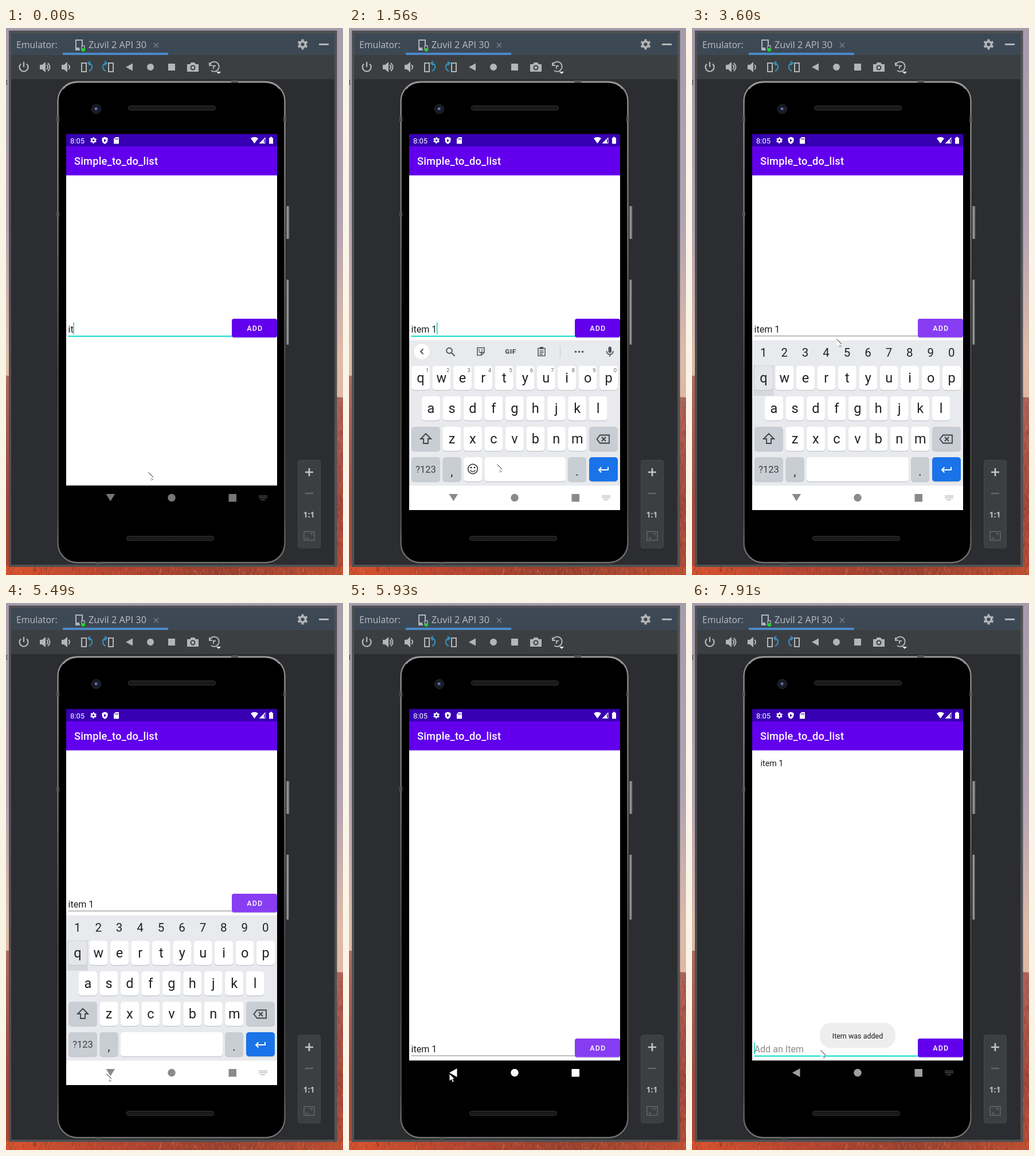
These frames come from a looping animation (588x952 px, 8 s). An HTML page:

```html
<!DOCTYPE html>
<html lang="en">
<head>
<meta charset="utf-8">
<title>To-do list in an emulator</title>
<style>
html, body { margin: 0; width: 100%; height: 100%; overflow: hidden; background: #2b2d30; }
svg { display: block; }
text { font-family: Roboto, "Liberation Sans", sans-serif; white-space: pre; }
.ui { font-family: "Open Sans", "Noto Sans", sans-serif; fill: #bcbec2; }
.line { fill: none; stroke: currentColor; stroke-width: 2; }
.icon { color: #b3b5b7; fill: #b3b5b7; }
.mid { text-anchor: middle; }
</style>
</head>
<body>
<svg width="588" height="952" viewBox="0 0 588 952">
  <defs>
    <linearGradient id="sky" x2="0" y2="1">
      <stop offset="0" stop-color="#a69cab"/><stop offset=".35" stop-color="#b3a3b3"/>
      <stop offset=".6" stop-color="#dfbba9"/><stop offset=".7" stop-color="#e0b7a2"/>
    </linearGradient>
    <linearGradient id="field-far" x2="0" y2="1">
      <stop offset="0" stop-color="#ad6a60"/><stop offset=".6" stop-color="#a04a3f"/><stop offset="1" stop-color="#ad4632"/>
    </linearGradient>
    <linearGradient id="field-near">
      <stop offset="0" stop-color="#d9522c"/><stop offset=".3" stop-color="#b8452f"/>
      <stop offset=".65" stop-color="#97412f"/><stop offset="1" stop-color="#bd4e30"/>
    </linearGradient>
    <linearGradient id="rim" x2="0" y2="1">
      <stop offset="0" stop-color="#8c8c8c"/><stop offset=".28" stop-color="#707070"/>
      <stop offset=".6" stop-color="#454545"/><stop offset=".9" stop-color="#4a4a4a"/><stop offset="1" stop-color="#747474"/>
    </linearGradient>
    <linearGradient id="side">
      <stop offset="0" stop-color="#3a3a3a"/><stop offset=".5" stop-color="#a0a0a0"/><stop offset="1" stop-color="#555"/>
    </linearGradient>
    <g id="gear" fill="none" stroke="currentColor">
      <circle r="4.9" stroke-width="3.8"/>
      <circle r="7.6" stroke-width="3" pathLength="12" stroke-dasharray="1" stroke-dashoffset="-.5"/>
    </g>
    <g id="speaker"><path d="M-7-4h4l6-5V9L-3 4h-4z"/><path class="line" d="M5-4q4 4 0 8"/></g>
    <g id="turn">
      <rect class="line" x="-9" y="-7" width="8" height="15"/>
      <path class="line" style="color:#3592c4" d="M3-7q7 1 6 8q-1 4-5 6M6-10l-4 3l4 4"/>
    </g>
    <g id="slot"><rect width="152" height="7.5" rx="3.7" fill="#161616" stroke="#3a3a3a"/><path d="M5 3.8h142" stroke="#2d2d2d" stroke-dasharray="2 1"/></g>
    <clipPath id="screen"><path d="M105 184h368v613H105z"/></clipPath>
    <clipPath id="pill"><rect x="394" y="506" width="79" height="32.5" rx="3.5"/></clipPath>
  </defs>

  <!-- wallpaper and window -->
  <path fill="url(#sky)" d="M0 0h588v952H0z"/>
  <path fill="url(#field-far)" d="M0 605L588 643v309H0z"/>
  <path fill="url(#field-near)" d="M0 936h588v16H0z"/>
  <g id="grass" fill="none"></g>
  <path fill="#4f5153" d="M5 4.500h572.500V938H5z"/>
  <path fill="#2b2d30" d="M9 9h564v925H9z"/>
  <path fill="#3d4855" d="M9 9h564v38H9z"/>
  <path fill="#3c3f41" d="M9 47h564v42H9z"/>
  <path fill="#4a88c7" d="M99 43h184v4H99z"/>
  <path d="M2 90q-3 4 0 9" fill="none" stroke="#333"/>
  <text class="ui" x="18" y="35" font-size="15.8">Emulator:</text>
  <text class="ui" x="144" y="35" font-size="16.3">Zuvil 2 API 30</text>
  <g class="icon">
    <path class="line" d="M129 38h-7V21h11v10"/>
    <path d="M122 34h6v4h-6z"/><path class="line" d="M132 31h5v7h-5z" style="stroke-width:1.3"/>
    <circle cx="135" cy="38" r="3" fill="#1fd62c"/>
    <path class="line" d="M258 26l8 8m0-8l-8 8" style="stroke-width:1.2;color:#7d858e"/>
    <use href="#gear" x="517.5" y="28.5"/>
    <path d="M546 27h17v3h-17z"/>
    <path class="line" d="M26 62.500a7.500 7.500 0 1 0 10 0M31 59v9" style="stroke-width:2.3"/>
    <use href="#speaker" x="66" y="68"/><path class="line" d="M73 61q7 7 0 14"/>
    <use href="#speaker" x="104" y="68"/>
    <use href="#turn" x="141" y="68"/><use href="#turn" transform="translate(178 68) scale(-1 1)"/>
    <path d="M209 68l12-6.500v13z"/><circle cx="252" cy="68" r="6"/><path d="M283 62h12v12h-12z"/>
    <path fill-rule="evenodd" d="M316 63h5l2-3h6l2 3h5v13h-20zM326 64.500a4.500 4.500 0 1 0 .01 0z"/><circle cx="326" cy="69" r="2.5"/>
    <path class="line" d="M355 60v5h5M355 65a8.500 8.500 0 1 1 3 9M366 66h-4v5"/><path d="M367 76h8l-4 4z" fill="#eee"/>
  </g>

  <!-- zoom panel -->
  <rect x="509.5" y="752" width="39" height="153" rx="4" fill="#3c3f41" stroke="#46494b"/>
  <path d="M522 773h14m-7-7v14" stroke="#c4c6c8" stroke-width="2.6"/>
  <path d="M522 810h14" stroke="#636668" stroke-width="2.5"/>
  <text class="ui mid" x="528.5" y="852" font-size="14" font-weight="700">1:1</text>
  <g color="#636668"><path class="line" d="M520 876.500h18v15h-18z" style="stroke-width:1.5"/><path class="line" d="M524 886v2.500h4M530 880h4v3" style="stroke-width:1.3"/></g>

  <!-- phone -->
  <path fill="url(#side)" d="M488 310h6.500v57H488zM488 438h5.500v113H488z"/>
  <rect x="88" y="91" width="401" height="842" rx="36" fill="#262626"/>
  <rect x="90.5" y="93.500" width="396" height="837" rx="33.5" fill="#000" stroke="url(#rim)" stroke-width="2.6"/>
  <path d="M100 106q9-11.500 26-11.500h325q17 0 26 11.500" fill="none" stroke="#a0a0a0" stroke-width="1.4"/>
  <path fill="#555" d="M88 154h5v9h-5zm0 166h5v8h-5zM484 154h5v9h-5zM157 929h10v4h-10zM393 91h12v4h-12z"/>
  <circle cx="157.5" cy="141" r="8" fill="#17181d" stroke="#303036"/>
  <circle cx="157.5" cy="141" r="4" fill="#232d52"/><circle cx="157" cy="140.500" r="1.700" fill="#8c98c0"/>
  <use href="#slot" x="213.5" y="135.5"/><use href="#slot" x="210.5" y="884.5"/>

  <!-- screen -->
  <path fill="#fff" d="M105 256h368v540.500H105z"/>
  <path fill="#3700b3" d="M105 184.500h368V207H105z"/>
  <path fill="#6200ee" d="M105 206h368v50.500H105z"/>
  <g fill="#fff" color="#fff">
    <text x="112" y="200.5" font-size="13">8:05</text>
    <use href="#gear" transform="translate(152.500 195.500) scale(.6)"/>
    <path fill-rule="evenodd" d="M172.500 189.500l5 2v4q-.5 4.500-5 6.500q-4.500-2-5-6.500v-4zM171 193v5.500l4-2.700z"/>
    <path fill-rule="evenodd" d="M191 190h6v11.500h-9V193zM190.500 192v2.500h1V192zm2 0v2.500h1V192zm2 0v2.500h1V192z"/>
    <path d="M427 192q6.500-4.500 13 0l-6.500 9z"/>
    <path fill-rule="evenodd" d="M441.500 201h11v-11zM450 199.700v-5.500l1.500-1.500v7z"/>
    <path d="M459 191h2v-1.500h3v1.500h2v10.500h-7z"/>
    <text x="119" y="238" font-size="18.2" font-weight="500" letter-spacing=".23">Simple_to_do_list</text>
  </g>
  <text id="row" x="119.5" y="283.5" font-size="14.3" fill="#1c1c1c">item 1</text>
  <g id="field">
    <text id="entry" x="108.5" y="529.5" font-size="16.1"></text>
    <path id="compose" d="M109 531.500h18.500" stroke="#222"/>
    <path id="rule"/>
    <path id="caret" d="M0 512.500v20.500" stroke="#03cdbd" stroke-width="1.5"/>
    <path d="M395 539.500h77" stroke="#ddd"/>
    <g clip-path="url(#pill)">
      <path id="button" d="M394 506h79v33h-79z"/>
      <circle id="ripple" cx="432" cy="520" fill="#fff" opacity=".1"/>
    </g>
    <text x="420.3" y="527" font-size="12.5" font-weight="500" letter-spacing="1.1" fill="#fff">ADD</text>
  </g>
  <g id="toast">
    <rect x="223" y="730.5" width="132" height="44" rx="20" fill="#eee"/>
    <text class="mid" x="289" y="757.5" font-size="12.5" fill="#1c1c1c">Item was added</text>
  </g>
  <g clip-path="url(#screen)"><g id="board">
    <path fill="#e8eaed" d="M105 543.500h368V797H105z"/>
    <path id="qHover" fill="#d6d8dc" d="M107 587h36v53h-36z"/>
    <path id="micHover" fill="#d4d6d9" d="M439 544h32v39h-32z"/>
    <g id="keys"></g>
    <g id="hints"></g>
    <g id="digits"></g>
    <g id="tools" fill="#50545a" color="#50545a">
      <circle cx="127" cy="563" r="13.5" fill="#fff"/>
      <path class="line" d="M129.500 558.500l-4.500 4.500l4.500 4.500"/>
      <circle class="line" cx="175" cy="561.5" r="4.8"/><path class="line" d="M178.500 565l6 6"/>
      <path class="line" d="M224 556.500h12v8l-5 5h-7zM236 564.500h-5v5M227 563q2.500 4 5 0" style="stroke-width:1.6"/>
      <path d="M226 559.500h2v2h-2zm5 0h2v2h-2z"/>
      <text class="mid" x="282" y="567.3" font-size="11.8" font-weight="900" letter-spacing=".5">GIF</text>
      <path class="line" d="M330 557.500h12v13h-12zM332.500 562h7m-7 3h7m-7 3h5" style="stroke-width:1.5"/><path d="M333 555h6v4h-6z"/>
      <path d="M368 553h1v21h-1z" fill="#c6c9cd"/>
      <circle cx="395.5" cy="563.5" r="1.8"/><circle cx="401.5" cy="563.5" r="1.8"/><circle cx="407.5" cy="563.5" r="1.8"/>
      <rect x="452.5" y="554.5" width="5.5" height="11" rx="2.7"/><path class="line" d="M449.500 562q0 6 5.700 6t5.700-6M455.200 568v4" style="stroke-width:1.7"/>
    </g>
    <g color="#3c4043">
      <path class="line" d="M134 706l9 9h-5v8h-8v-8h-5z" style="stroke-width:1.8"/>
      <path class="line" d="M438 708.500h16v14h-16l-5.500-7zM441 712l7 7m0-7l-7 7" style="stroke-width:1.8"/>
      <path class="line" style="color:#fff" d="M452 764v5h-16m4.500-4.500l-4.500 4.500l4.500 4.500"/>
    </g>
    <g id="smile" color="#3c4043">
      <circle class="line" cx="216" cy="767.5" r="8.3" style="stroke-width:1.7"/>
      <path class="line" d="M211.500 769.500q4.500 6 9 0" style="stroke-width:1.6"/>
      <circle cx="213" cy="765" r="1.3"/><circle cx="219" cy="765" r="1.3"/>
    </g>
  </g></g>
  <g id="nav">
    <path id="navBack" d="M105 796.500h368V839H105z"/>
    <path id="back"/>
    <circle cx="289" cy="817.5" r="6.7"/><path d="M388.500 811h13.500v13.500h-13.500z"/>
    <path id="boardIcon" fill="none" stroke="#8a8a8a" stroke-width="1.5" stroke-dasharray="1.5 1" d="M441.500 814.500h14m-14 3h14m-11 3.500h8"/>
  </g>
  <g id="pointer"><path fill="#fff" d="M0 0v12l3-2.500l2.300 5l2-1l-2.300-5h4z"/><path d="M0 0l8.500 8.500M4 10.500l1 1m-.5 1.500l1 1m1-3l1 2" fill="none" stroke="#111"/></g>
</svg>
<script>
const $ = id => document.getElementById(id);
const set = (id, attrs) => { for (const k in attrs) $(id).setAttribute(k, attrs[k]); };
const show = (id, on) => set(id, { visibility: on ? 'visible' : 'hidden' });

// Grass along the right and bottom edges, from a seeded generator
let seed = 7;
const rnd = () => (seed = seed * 16807 % 2147483647) / 2147483647;
$('grass').innerHTML = ['#dc7350', '#7d3328', '#c2553f', '#a65a4f'].map(color => {
  let d = '';
  for (let i = 0; i < 130; i++) {
    const low = i % 3, x = low ? rnd() * 588 : 577 + rnd() * 11, y = low ? 936 + rnd() * 14 : 645 + rnd() * 300;
    d += `M${x} ${y}l${rnd() * 4 - 2} ${4 + rnd() * 5}`;
  }
  return `<path d="${d}" stroke="${color}" opacity=".6"/>`;
}).join('');

const PITCH = 36.45;
const label = (s, x, y, size, fill = '#202124') =>
  `<text class="mid" x="${x}" y="${y}" font-size="${size}" fill="${fill}">${s}</text>`;
const key = (x, y, w, fill = '#fff', id = '') =>
  `<rect x="${x}" y="${y + 1.2}" width="${w}" height="42" rx="5" fill="#c3c6ca"/>` +
  `<rect ${id && `id="${id}"`} x="${x}" y="${y}" width="${w}" height="42" rx="5" fill="${fill}"/>`;

const GREY = '#c9cdd4';
let keys = '';
[['qwertyuiop', 125], ['asdfghjkl', 143], ['zxcvbnm', 179.5]].forEach(([letters, x0], r) =>
  [...letters].forEach((c, i) => {
    const x = x0 + i * PITCH, y = 588 + r * 53;
    keys += key(x - 16, y, 32, '#fff', c === 'q' ? 'q' : '') + label(c, x, y + 29, 23.5);
  }));
keys += key(109, 694, 50, GREY) + key(419, 694, 50, GREY) + key(109, 747, 50, GREY) +
  key(163.5, 747, 32, GREY) + key(382, 747, 32, GREY) + key(419, 747, 50, '#1a73e8') +
  `<g id="shortSpace">${key(200, 747, 32) + key(236.5, 747, 141.5)}</g>` +
  `<g id="longSpace">${key(200, 747, 178)}</g>` +
  label('?123', 134, 774, 16.5, '#3c4043') + label(',', 179.5, 779, 20) + label('.', 398, 779, 20);
$('keys').innerHTML = keys;
const numbers = [...'1234567890'];
$('hints').innerHTML = numbers.map((c, i) => label(c, 136.3 + i * PITCH, 599, 9.5, '#5f6368')).join('');
$('digits').innerHTML = numbers.map((c, i) => label(c, 124.7 + i * PITCH, 571.5, 20.5)).join('');

// Bursts of change: start ms, end ms, number of steps
const BURSTS = [[280, 1280, 8], [1560, 2570, 8], [2720, 3600, 7], [4910, 5490, 5], [5780, 6780, 8], [6910, 7910, 8]];
function stepAt(t) {
  let n = 0;
  for (const [start, end, count] of BURSTS) {
    const gap = (end - start) / (count - 1);
    if (t >= start) n += Math.min(count, 1 + Math.floor((t - start + 10) / gap));
  }
  return n;
}

// Pointer stops: step, x, y
const PATH = [[0, 248, 773], [8, 248, 773], [15, 431, 512], [16, 431, 512], [23, 252, 541], [27, 168, 824],
  [28, 175, 819], [30, 175, 819], [33, 431, 768], [37, 431, 768], [44, 224, 778]];
function pointerAt(n) {
  const i = Math.max(1, PATH.findIndex(p => p[0] >= n));
  const [n0, x0, y0] = PATH[i - 1], [n1, x1, y1] = PATH[i];
  const u = (n - n0) / (n1 - n0), e = u * u * (3 - 2 * u);
  return [x0 + (x1 - x0) * e, y0 + (y1 - y0) * e].map(v => Math.round(v) + .5);
}

const TYPED = [[34, ''], [8, 'item 1'], [6, 'item '], [4, 'item'], [1, 'ite'], [0, 'it']];

function draw(n) {
  const within = (a, b) => n >= a && n <= b;
  const typed = TYPED.find(([from]) => n >= from)[1];
  const active = n < 16 || n >= 37;
  const boardUp = within(2, 29), numeric = n >= 19;

  // Entry row
  set('field', { transform: `translate(0 ${n >= 30 ? 252 : 0})` });
  $('entry').textContent = typed;
  const caretX = 108.8 + (typed ? $('entry').getComputedTextLength() : 0);
  $('entry').textContent = typed || 'Add an Item';
  set('entry', { fill: typed ? '#1c1c1c' : '#8c8c8c' });
  set('caret', { transform: `translate(${caretX} 0)` });
  show('caret', active && !within(11, 13));
  show('compose', within(3, 5));
  set('rule', { d: `M108.5 535.5H394v${active ? 2 : 1}H108.5z`, fill: active ? '#03dac5' : '#7c7c7c' });
  set('button', { fill: within(17, 36) ? '#873df2' : '#6200ee' });
  set('ripple', { r: n === 15 || n === 33 ? 24 : n === 16 || n === 34 ? 60 : 0 });
  show('row', n >= 34);
  set('toast', { opacity: n < 35 ? 0 : n === 35 ? .5 : 1 });

  // Keyboard
  set('board', { display: boardUp ? 'inline' : 'none', transform: `translate(0 ${n === 2 || n === 29 ? 130 : 0})` });
  for (const id of ['tools', 'hints', 'smile', 'shortSpace']) show(id, !numeric);
  for (const id of ['digits', 'longSpace']) show(id, numeric);
  show('micHover', within(14, 18));
  show('qHover', n >= 16);
  set('q', { fill: n >= 16 ? '#e4e6ea' : '#fff' });

  // Navigation bar
  const plain = within(30, 39);
  set('nav', { fill: plain ? '#fff' : boardUp ? '#8a8a8a' : n < 2 ? '#777' : '#a0a0a0' });
  set('navBack', { fill: boardUp ? '#fff' : '#000' });
  set('back', { d: n < 30 ? 'M174.5 811h15.5l-7.7 12.5z' : 'M175 817.5l13.5-7.5v15z' });
  show('boardIcon', !plain);

  set('pointer', { transform: `translate(${pointerAt(n)})` });
}

const t0 = performance.now();
let last = -1;
function tick() {
  const n = stepAt((performance.now() - t0) % 8000);
  if (n !== last) draw(last = n);
  requestAnimationFrame(tick);
}
tick();
</script>
</body>
</html>
```
